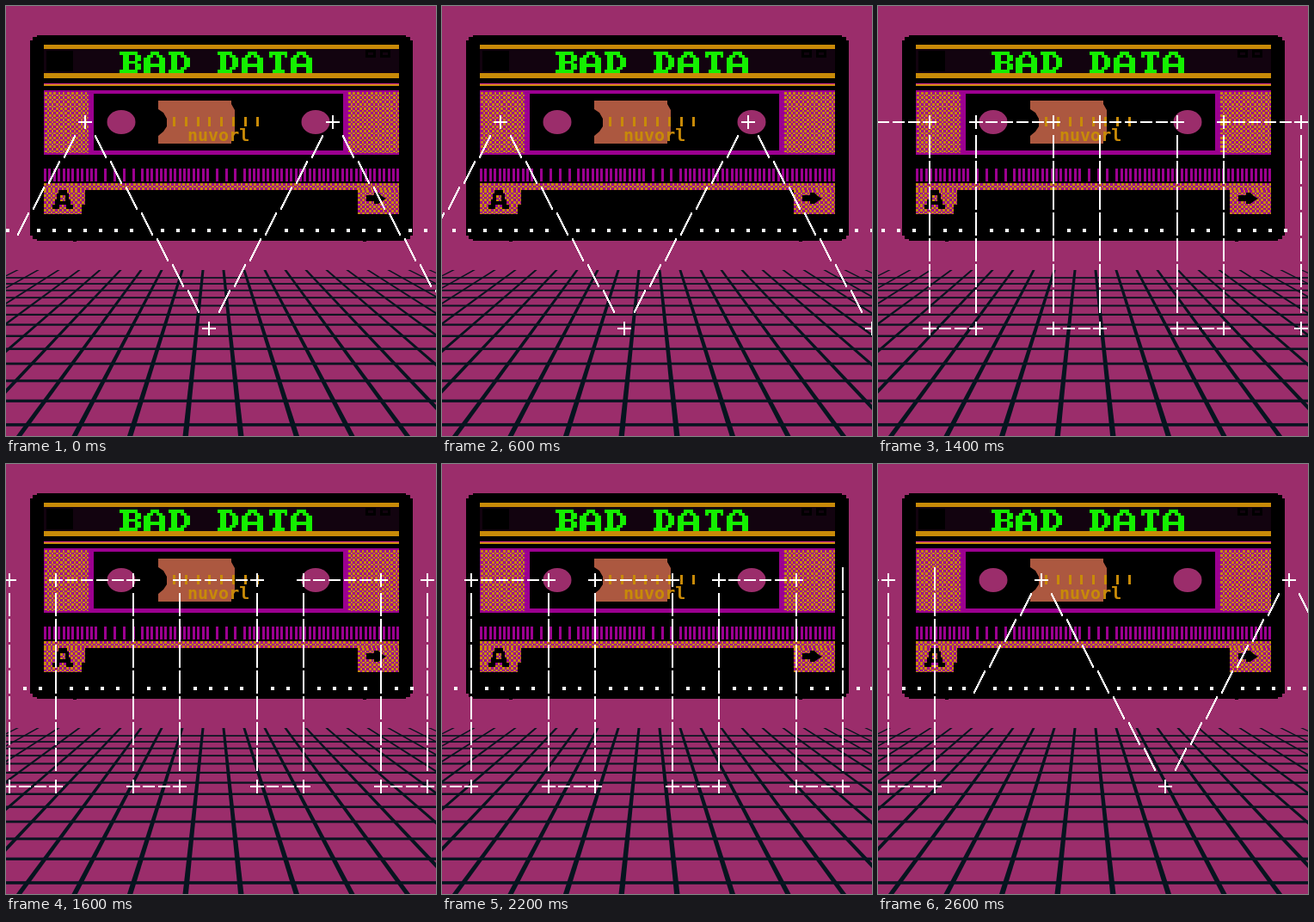
Recreate the animation shown at these times as an HTML page with a canvas. Size 500 by 500 pixels, loop 2.7 s.

```html
<!DOCTYPE html>
<html lang="en">
<head>
<meta charset="utf-8">
<title>Bad Data</title>
<style>
  html, body { margin: 0; width: 100%; height: 100%; overflow: hidden; background: #9b2d6b; }
  canvas { display: block; }
</style>
</head>
<body>
<canvas id="stage" width="500" height="500" role="img" aria-label="BAD DATA"></canvas>
<script>
const PINK = '#9b2d6b', MAGENTA = '#9c0090', GOLD = '#c88a08', GREEN = '#14f000';
const LABEL = '#12030f', GRID = '#06141f';

const ctx = document.getElementById('stage').getContext('2d');
const backdrop = document.createElement('canvas');
backdrop.width = backdrop.height = 500;
const bg = backdrop.getContext('2d');

function rect(color, left, top, right, bottom) {
  bg.fillStyle = color;
  bg.fillRect(left, top, right - left, bottom - top);
}

function polygon(color, ...points) {
  bg.fillStyle = color;
  bg.beginPath();
  points.forEach(([x, y]) => bg.lineTo(x, y));
  bg.fill();
}

function checker(left, top, right, bottom, size = 2.6) {
  rect(MAGENTA, left, top, right, bottom);
  for (let j = 0; top + j * size < bottom; j++) {
    for (let i = j % 2; left + i * size < right; i += 2) {
      const x = Math.round(left + i * size), y = Math.round(top + j * size);
      rect(GOLD, x, y,
        Math.min(right, Math.round(left + (i + 1) * size)),
        Math.min(bottom, Math.round(top + (j + 1) * size)));
    }
  }
}

// Each glyph is seven rows of eight bits.
const GLYPHS = {
  A: [0x38, 0x6c, 0xc6, 0xc6, 0xfe, 0xc6, 0xc6],
  B: [0xfc, 0x66, 0x66, 0x7c, 0x66, 0x66, 0xfc],
  D: [0xf8, 0x6c, 0x66, 0x66, 0x66, 0x6c, 0xf8],
  T: [0x7e, 0x5a, 0x18, 0x18, 0x18, 0x18, 0x3c],
};

function pixelText(text, left, top, size) {
  [...text].forEach((char, n) => (GLYPHS[char] || []).forEach((bits, row) => {
    for (let col = 0; col < 8; col++) {
      if (!(bits & (128 >> col))) continue;
      const x = left + (n * 8 + col) * size, y = top + row * size;
      rect(GREEN, Math.round(x), Math.round(y), Math.round(x + size), Math.round(y + size));
    }
  }));
}

function drawFloor() {
  const top = 307, center = 241;
  const spacing = y => (y - 193) * 0.2102;
  for (let k = -11; k < 11; k++) {
    const xTop = center + (k + 0.5) * spacing(top);
    const xEnd = center + (k + 0.5) * spacing(500);
    polygon(GRID, [xTop - 1.5, top], [xTop + 1.5, top], [xEnd + 3.2, 500], [xEnd - 3.2, 500]);
  }
  for (let k = 0; k < 13; k++) {
    const depth = 1 / (0.003106 + 0.000293 * k);
    const half = depth / 180;
    rect(GRID, 0, 165 + depth - half, 500, 165 + depth + half);
  }
}

function drawCassette() {
  rect('#000', 28, 40, 473, 267);
  rect('#000', 31, 36, 470, 271);
  rect('#000', 36, 34, 465, 273);
  rect('#000', 78, 272, 82, 274);
  rect('#000', 415, 272, 419, 274);

  rect(GOLD, 44, 45, 457, 84);
  rect(LABEL, 44, 50, 457, 78);
  rect('#000', 47, 52, 78, 76);
  for (const x of [418, 435]) {
    rect('#000', x, 51, x + 12, 60);
    rect(LABEL, x + 3, 54, x + 9, 57);
  }
  pixelText('BAD DATA', 132, 53, 3.55);
  rect('#e0309a', 44, 90, 457, 91);
  rect(GOLD, 44, 91, 457, 93);

  rect(MAGENTA, 44, 98, 457, 173);
  checker(45, 100, 96, 171);
  checker(398, 100, 457, 171);
  rect('#000', 102, 102, 392, 168);
  for (const x of [134, 360]) {
    bg.fillStyle = PINK;
    bg.beginPath();
    bg.ellipse(x, 135, 16.5, 14, 0, 0, 7);
    bg.fill();
  }
  polygon('#ac5840', [177, 110], [262, 110], [262, 114], [266, 121], [266, 150],
    [262, 153], [262, 160], [177, 160], [177, 151], [183, 146], [187, 140], [187, 131],
    [183, 124], [177, 120]);
  for (let i = 0; i < 8; i++) {
    const x = Math.round(194 + i * 13.8);
    rect(GOLD, x, 129, x + 3, 140);
  }
  bg.fillStyle = GOLD;
  bg.font = 'bold 20px "DejaVu Sans Mono", monospace';
  bg.fillText('nuvorl', 211, 157);

  for (let i = 0; i < 77; i++) {
    const x = Math.round(44 + i * 5.4);
    const sparse = (x > 100 && x < 154) || (x > 230 && x < 276);
    if (!sparse || i % 2) rect(MAGENTA, x, 189, x + 3, 204);
  }

  checker(44, 206, 457, 214);
  checker(44, 214, 92, 231);
  checker(44, 231, 88, 242);
  checker(409, 214, 457, 242);
  rect('#000', 61, 214, 71, 218);
  rect('#000', 59, 218, 73, 225);
  rect('#000', 57, 225, 75, 231);
  rect('#000', 54, 231, 62, 236);
  rect('#000', 70, 231, 78, 236);
  checker(63, 220, 69, 227);
  polygon('#000', [419, 220], [428, 220], [428, 217], [433, 217], [437, 221], [442, 224],
    [437, 227], [433, 230], [428, 230], [428, 227], [419, 227]);
}

rect(PINK, 0, 0, 500, 500);
drawFloor();
drawCassette();

// The wave is a strip of character cells, 18 by 30, nine rows high.
const CELL_W = 18, CELL_H = 30, TOP = 120, STRIP = 2698, STEP = 100, STEPS = 27;

function line(x1, y1, x2, y2) {
  ctx.moveTo(x1, y1);
  ctx.lineTo(x2, y2);
}

// A crisp diagonal stroke made of small steps; side is 1 for \ and -1 for /.
function slash(x, y, side) {
  for (let i = -6; i <= 6; i++) {
    const top = y + (i + 6) * 2;
    line(x + side * i, top, x + side * i, top + 3);
  }
}

function cell(char, x, row) {
  const y = TOP + row * CELL_H, mid = y + 15;
  if (char === '+') { line(x - 8, mid, x + 8, mid); line(x, mid - 8, x, mid + 8); }
  if (char === '-') line(x - 7, mid, x + 7, mid);
  if (char === '|') line(x, y, x, y + 27);
  if (char === '/') slash(x, y, -1);
  if (char === '\\') slash(x, y, 1);
  if (char === '.') { line(x - 2, y + 20, x + 2, y + 20); line(x - 2, y + 22, x + 2, y + 22); }
}

function triangleColumn(col, x) {
  const phase = (col + 12) % 16;
  const row = phase <= 8 ? phase : 16 - phase;
  cell(phase % 8 === 0 ? '+' : phase < 8 ? '\\' : '/', x, row);
  if (row !== 4) cell('.', x, 4);
}

function squareColumn(col, x) {
  const phase = col % 8;
  if (phase === 0 || phase === 5) {
    cell(col === 72 ? '|' : '+', x, 0);
    for (let row = 1; row < 8; row++) cell('|', x, row);
    cell(col === 0 ? '|' : '+', x, 8);
  } else {
    cell('-', x, phase < 5 ? 0 : 8);
    cell('.', x, 4);
  }
}

function drawStrip(left) {
  for (let col = -1; col < 149; col++) {
    const x = left + col * CELL_W;
    if (x < -10 || x > 510) continue;
    if (col >= 0 && col <= 72) triangleColumn(col, x);
    else if (col >= 75 && col <= 147) squareColumn(col - 75, x);
    else cell('.', x, 4);
  }
}

function draw() {
  const step = Math.floor(performance.now() / 100) % STEPS;
  ctx.drawImage(backdrop, 0, 0);
  ctx.strokeStyle = '#fff';
  ctx.lineWidth = 2;
  ctx.beginPath();
  drawStrip(20 - step * STEP);
  drawStrip(20 - step * STEP + STRIP);
  ctx.stroke();
  requestAnimationFrame(draw);
}
draw();
</script>
</body>
</html>
```
